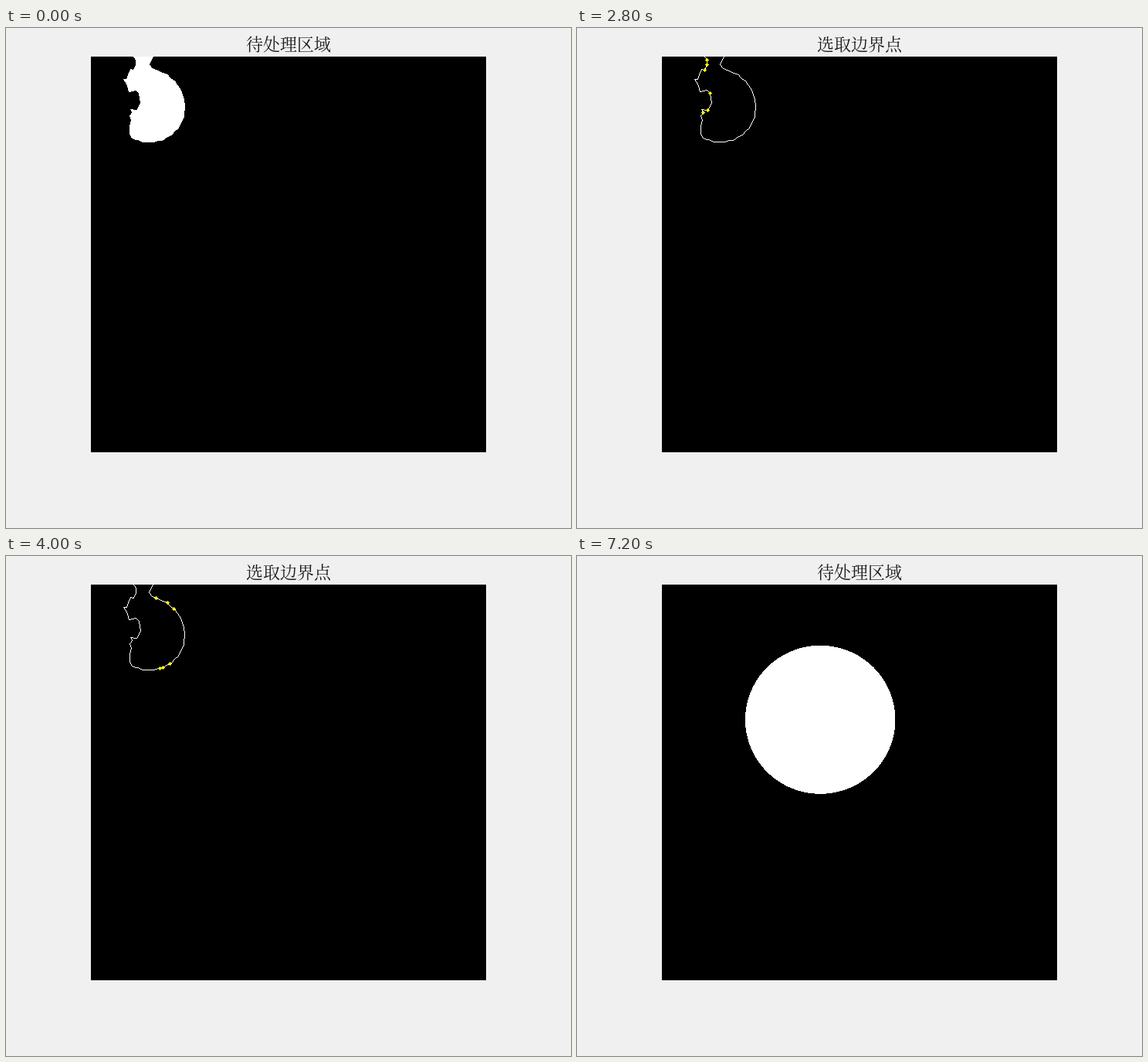
Animation of 732x647 px, one loop 8000 ms. Source, as an HTML page with a canvas:

```html
<!DOCTYPE html>
<html lang="zh-CN">
<head>
<meta charset="utf-8">
<style>
html, body { margin: 0; width: 100%; height: 100%; overflow: hidden; background: #f0f0f0; }
canvas { position: absolute; left: 0; top: 0; }
#title {
  position: absolute; left: 0; top: 9px; width: 732px; height: 22px;
  font: 200 22px/22px SimSun, "Noto Serif CJK SC", "Noto Sans CJK SC", "Noto Sans CJK", serif;
  text-align: center; white-space: nowrap; color: #1a1a1a;
}
</style>
</head>
<body>
<canvas id="stage" width="732" height="647"></canvas>
<div id="title"></div>
<script>
const LOOP = 8000, STEP = 100, WINDOW = 6;
const title = document.getElementById('title');
const ctx = document.getElementById('stage').getContext('2d');

const parse = s => s.trim().split(/\s+/).map(p => p.split(',').map(Number));

// Slightly tilted round rim with a fine ripple
function rim(deg) {
  const a = deg * Math.PI / 180;
  const r = 47 + Math.sin(2 * a) + .5 * Math.sin(23 * a);
  return [Math.round(184 + r * Math.cos(a)), Math.round(100 + r * Math.sin(a))];
}
const arc = [];
for (let deg = -78; deg <= 118; deg += 4) arc.push(rim(deg));

// Corners that can be picked, and the bends between them (marked 0)
const neck = parse('190,37,0 188,40 185,47 189,52');
const bay = parse(`
  160,137,0 160,126 162,119 160,113 163,109 161,105,0 169,106 174,97 172,84
  168,80,0 159,82 156,72 152,66 156,66,0 158,60 161,53 165,54 168,47 168,41 165,37,0`);
const border = [...neck, ...arc, ...bay];

// Picked points are visited column by column
const points = [...neck, ...bay].filter(p => p[2] !== 0)
  .concat([-78, -58, -44, 43, 54, 67, 72, 94, 98].map(rim))
  .sort((p, q) => p[0] - q[0] || p[1] - q[1]);

const shape = new Path2D();
border.forEach(([x, y]) => shape.lineTo(x + .5, y + .5));
shape.closePath();

const oval = (x, y, rx, ry, turn) => {
  const p = new Path2D();
  p.ellipse(x, y, rx, ry, turn, 0, 2 * Math.PI);
  return p;
};
const rebuilt = oval(183.8, 100, 48, 46, Math.PI / 4);
const disc = oval(315.2, 211.8, 97.2, 96, 0);

// Hard-edged fill: one run of pixels at a time
function fill(path, x0, y0, x1, y1) {
  for (let y = y0; y < y1; y++) {
    let start = -1;
    for (let x = x0; x <= x1; x++) {
      const inside = x < x1 && ctx.isPointInPath(path, x + .5, y + .5);
      if (inside && start < 0) start = x;
      if (!inside && start >= 0) {
        ctx.fillRect(start, y, x - start, 1);
        start = -1;
      }
    }
  }
}

function outline() {
  for (let i = 1; i < border.length; i++) {
    const [ax, ay] = border[i - 1], [bx, by] = border[i];
    const n = Math.max(Math.abs(bx - ax), Math.abs(by - ay)) || 1;
    for (let k = 0; k <= n; k++) {
      ctx.fillRect(Math.round(ax + (bx - ax) * k / n), Math.round(ay + (by - ay) * k / n), 1, 1);
    }
  }
}

function region() {
  fill(shape, 150, 37, 235, 150);
  outline();
}

function picked(first) {
  outline();
  ctx.fillStyle = '#ff0';
  for (const [x, y] of points.slice(first, first + WINDOW)) {
    ctx.fillRect(x - 1, y - 1, 3, 3);
    ctx.fillRect(x - 2, y, 5, 1);
    ctx.fillRect(x, y - 2, 1, 5);
  }
}

const scenes = [
  [0, '待处理区域', region],
  [1000, '边界提取', outline],
  [2000, '选取边界点', picked],
  [4200, '选取结束', picked],
  [5200, '重构结果', () => fill(rebuilt, 130, 45, 240, 155)],
  [7200, '待处理区域', () => fill(disc, 210, 110, 420, 315)]
];

let shown = '';
function frame() {
  const t = performance.now() % LOOP;
  const scene = scenes.filter(s => s[0] <= t).pop();
  const last = points.length - WINDOW;
  const first = Math.max(0, Math.min(last, Math.floor((t - 2000) / STEP)));
  const key = scene[0] + ':' + (scene[2] === picked ? first : 0);
  if (key !== shown) {
    shown = key;
    title.textContent = scene[1];
    ctx.fillStyle = '#000';
    ctx.fillRect(110, 37, 512, 512);
    ctx.fillStyle = '#fff';
    scene[2](first);
  }
  requestAnimationFrame(frame);
}
frame();
</script>
</body>
</html>
```
